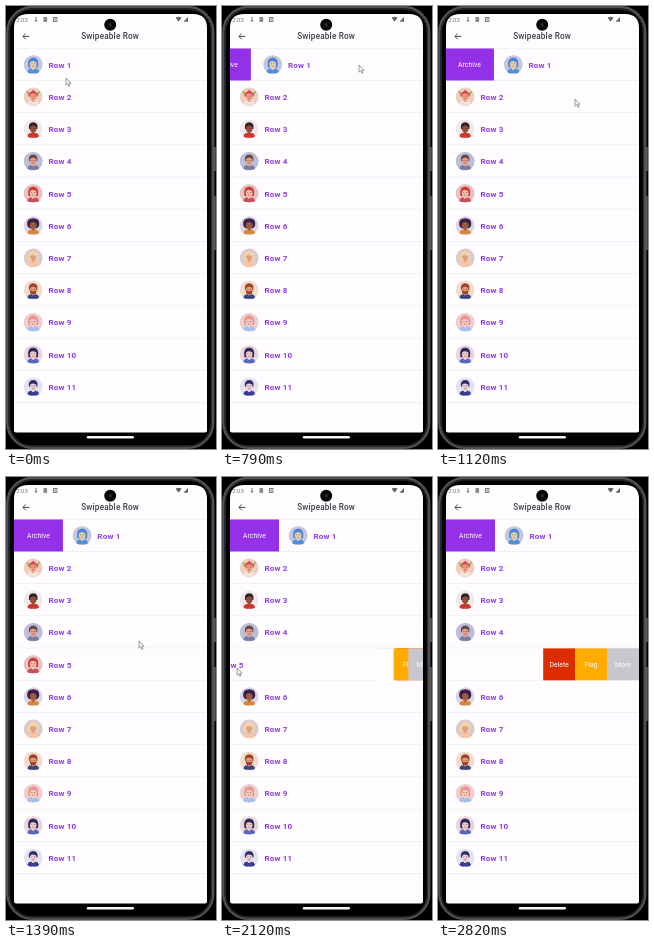
An HTML page for the animation above (2850 ms loop, 210 px wide and 443 px high).

```html
<!DOCTYPE html>
<html lang="en">
<head>
<meta charset="utf-8">
<title>Swipeable Row</title>
<style>
  html, body { margin: 0; width: 100%; height: 100%; overflow: hidden; background: #000; }
  svg { display: block; width: 100vw; height: 100vh; }
  text { font-family: Roboto, "Liberation Sans", sans-serif; }
  .title { font-size: 8.2px; font-weight: 500; letter-spacing: .18px; fill: #404046; }
  .name { font-size: 8.1px; font-weight: 700; letter-spacing: .17px; fill: #8f3fe0; }
  .action { font-size: 6.8px; letter-spacing: .05px; fill: #fff; text-anchor: middle; }
  .clock { font-size: 6px; fill: #777; }
</style>
</head>
<body>
<svg viewBox="0 0 210 443" xmlns="http://www.w3.org/2000/svg">
  <defs>
    <clipPath id="screen"><path d="M8 22Q8 8 22 8H187Q201 8 201 22V424.5Q201 426.5 199 426.5H10Q8 426.5 8 424.5Z"/></clipPath>
    <clipPath id="disc"><circle r="9.6"/></clipPath>
  </defs>
  <rect width="210" height="443" fill="#000"/>
  <rect x="1.3" y="1" width="205.9" height="440.8" rx="25" fill="#060606" stroke="#505050" stroke-width="2.4"/>
  <rect x="3.2" y="2.9" width="202.1" height="437" rx="23" fill="#000" stroke="#2c2c2c" stroke-width="1.2"/>
  <path d="M208.8 141V165M208.8 190V244" stroke="#5e5e5e" stroke-width="1.8"/>

  <g clip-path="url(#screen)">
    <rect x="8" y="8" width="193" height="419" fill="#fefcff"/>
    <text class="clock" x="10.3" y="16">2:03</text>
    <g fill="#8a8a8a">
      <path d="M29.4 11h1.2v3h1.1L30 16.2 28.3 14H29.4Z"/>
      <rect x="37.5" y="11" width="3.6" height="5" rx=".6"/>
      <rect x="47.4" y="11.5" width="3.6" height="4" fill="none" stroke="#808080"/>
      <rect x="48.5" y="12.5" width="1.4" height="2"/>
    </g>
    <path d="M169.6 11.8Q172.6 9.8 175.6 11.8L172.6 15.8ZM177.4 15.8L182 11V15.8Z" fill="#666"/>
    <path d="M23.4 30.4H17M19.8 27.5L16.9 30.4L19.8 33.3" fill="none" stroke="#333" stroke-width=".9"/>
    <text class="title" x="75.2" y="33.4">Swipeable Row</text>
    <path d="M8 42.5H201" stroke="#e6e3ea" stroke-width=".7"/>
    <g id="list"></g>
  </g>
  <circle cx="104.2" cy="18.7" r="6" fill="#050505"/>
  <circle cx="104.2" cy="18.7" r="2" fill="#22242c"/>
  <rect x="80.8" y="430" width="47.2" height="2.4" rx="1.2" fill="#f4f4f4"/>
  <path id="cursor" d="M0 0V7.2L1.7 5.7L2.8 8.3L4 7.8L2.9 5.3H5.1Z" fill="#f6f4f8" stroke="#666" stroke-width=".6"/>
</svg>
<script>
const LOOP = 2850;
const TOP = 42.5, PITCH = 32.22;
const LEFT_OPEN = 49, RIGHT_OPEN = 96, BUTTON = 32;
const SETTLE = 73;
const list = document.getElementById('list');
const cursor = document.getElementById('cursor');

// backdrop, hair, skin, clothes, hair style
const people = [
  ['#c6c6dd', '#4a86d8', '#f1d3a8', '#4f8fdc', 'bob'],
  ['#eccfc0', '#e0455a', '#efa184', '#f0e4d8', 'crown'],
  ['#efe8ec', '#2f2023', '#93523c', '#d63328', 'short'],
  ['#bcbdd8', '#6a4a45', '#e0a18a', '#757ca2', 'short'],
  ['#e6c2c2', '#cc4038', '#f4c4ae', '#c5505a', 'bob'],
  ['#ddd5e6', '#38214a', '#a4613f', '#dc8638', 'afro'],
  ['#d9cace', '#f3d6a4', '#f0b08c', '#f5c6a0', 'bob'],
  ['#f3dccd', '#9c4226', '#eda07a', '#33457f', 'beard'],
  ['#eccfd1', '#ee948a', '#f6cfc4', '#a5c0ea', 'bob'],
  ['#ead5dc', '#2c2a5a', '#f4cdc8', '#5468bc', 'bob'],
  ['#e5e2f0', '#2b2c68', '#ecd0d8', '#353c92', 'short']
];
const hairBack = {
  bob: 'M-4.8 2.6Q-6.4-6.8 0-7Q6.4-6.8 4.8 2.6Z',
  afro: 'M-6-1Q-6.6-7.4 0-7.4Q6.6-7.4 6-1Q5.6 3 0 3Q-5.6 3-6-1Z',
  short: 'M-4.2 0Q-5.2-6.8 0-6.8Q5.2-6.8 4.2 0Z',
  crown: 'M-4 0L-6.6-5L-2.6-4.4L0-7.4L2.6-4.4L6.6-5L4 0Z'
};
hairBack.beard = hairBack.short;

function avatar([back, hair, skin, clothes, style]) {
  const beard = style === 'beard' ? `<path d="M-3.3 0Q0 2 3.3 0Q3.4 4.2 0 4.2Q-3.4 4.2-3.3 0Z" fill="${hair}"/>` : '';
  const leaves = style === 'crown' ? '<path d="M-7-6L-2.4-4.4L-5-2ZM7-6L2.4-4.4L5-2Z" fill="#9cbf55"/>' : '';
  return `<g clip-path="url(#disc)">
    <circle r="9.6" fill="${back}"/>
    <path d="${hairBack[style]}" fill="${hair}"/>${leaves}
    <path d="M-6 8.6Q-5.8 4.2-2 4H2Q5.8 4.2 6 8.6Z" fill="${clothes}"/>
    <path d="M-1.4 2H1.4V4.6Q0 6-1.4 4.6Z" fill="${skin}"/>
    <ellipse cy="-.6" rx="3.3" ry="3.9" fill="${skin}"/>${beard}
    <path d="M-3.5-1.4Q-3.8-5.6 0-5.6Q3.8-5.6 3.5-1.4Q2.4-3.6-.6-3.4Q-2.8-3.4-3.5-1.4Z" fill="${hair}"/>
    <path d="M-1.7-.8h.8M.9-.8h.8" stroke="#3a2530" stroke-width=".8"/>
    <path d="M-1 1.5Q0 2.2 1 1.5" fill="none" stroke="#b03a3a" stroke-width=".6"/>
  </g>`;
}

function button(id, label, color, width) {
  return `<g id="${id}"><rect width="${width}" height="${PITCH}" fill="${color}"/>
    <text class="action" x="${width / 2}" y="18.7">${label}</text></g>`;
}

function row(person, i) {
  let actions = '';
  if (i === 0) actions = button('archive', 'Archive', '#9330e8', LEFT_OPEN);
  if (i === 4) actions = button('delete', 'Delete', '#dd2c00', BUTTON)
    + button('flag', 'Flag', '#ffab00', BUTTON) + button('more', 'More', '#c8c7cd', BUTTON);
  return `<g transform="translate(0 ${TOP + PITCH * i})">${actions}
    <g id="row${i + 1}"><rect x="8" width="193" height="${PITCH}" fill="#fefcff"/>
      <path d="M8 ${PITCH - .2}H201" stroke="#e6e3ea" stroke-width=".7"/>
      <g transform="translate(27.2 16.1)">${avatar(person)}</g>
      <text class="name" x="42.4" y="19.2">Row ${i + 1}</text></g></g>`;
}
list.innerHTML = people.map(row).join('');

// time, x, y of the pointer tip
const path = [
  [0, 60, 72], [30, 60, 72], [240, 85, 58], [520, 85, 58], [790, 137, 59],
  [880, 137, 59], [1030, 137, 91], [1120, 137, 93], [1390, 133, 164],
  [1580, 112, 188], [1620, 112, 188], [2120, 15, 191], [2250, -9, 191], [LOOP, -9, 191]
];

// Monotone cubic through the path points
function along(t, k) {
  const rate = i => i < 0 || i > path.length - 2 ? 0
    : (path[i + 1][k] - path[i][k]) / (path[i + 1][0] - path[i][0]);
  const slope = i => {
    const a = rate(i - 1), b = rate(i);
    return a * b > 0 ? 2 * a * b / (a + b) : 0;
  };
  let i = 0;
  while (i < path.length - 2 && t >= path[i + 1][0]) i++;
  const h = path[i + 1][0] - path[i][0], u = (t - path[i][0]) / h, v = 1 - u;
  return path[i][k] * v * v * (1 + 2 * u) + path[i + 1][k] * u * u * (3 - 2 * u)
    + h * u * v * (v * slope(i) - u * slope(i + 1));
}

// The row follows at half the pointer's pace, then settles open
function openness(t, start, release, drag) {
  if (t < start) return 0;
  const held = Math.max(0, drag(along(Math.min(t, release), 1)));
  return t < release ? held : 1 - (1 - held) * Math.exp((release - t) / SETTLE);
}

function move(id, x) {
  document.getElementById(id).setAttribute('transform', `translate(${x.toFixed(2)} 0)`);
}

function draw(time) {
  const t = time % LOOP;
  const left = openness(t, 520, 880, x => (x - 90) / 2 / LEFT_OPEN);
  const right = openness(t, 1620, 2370, x => (103 - Math.max(x, -2)) / 2 / RIGHT_OPEN);
  move('row1', LEFT_OPEN * left);
  move('archive', 8 - 54 * (1 - left));
  move('row5', -RIGHT_OPEN * right);
  move('delete', 105 + 128 * (1 - right));
  move('flag', 137 + 64 * (1 - right));
  move('more', 169 + 32 * (1 - right));
  cursor.setAttribute('transform', `translate(${along(t, 1).toFixed(2)} ${along(t, 2).toFixed(2)})`);
}

let begin;
function tick(now) {
  begin ??= now;
  draw(Math.max(0, now - begin));
  requestAnimationFrame(tick);
}
draw(0);
requestAnimationFrame(tick);
</script>
</body>
</html>
```
